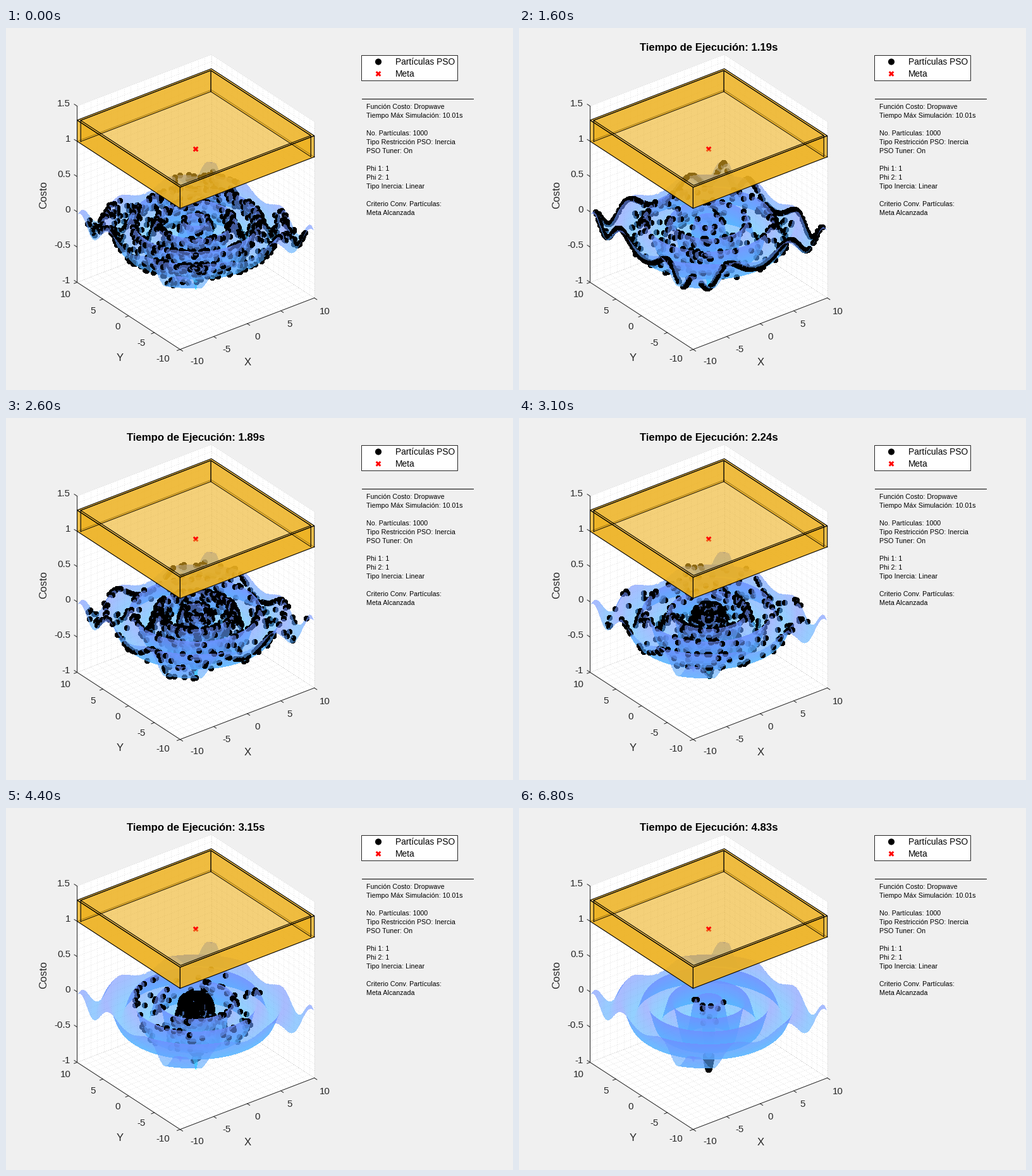
Write a matplotlib script that moves like this. It is 802 by 573 pixels and loops after 6900 ms.

```python
import numpy as np
import matplotlib.pyplot as plt
from matplotlib.animation import FuncAnimation
from matplotlib.collections import LineCollection
from matplotlib.patches import Circle, Polygon, Rectangle

W, H, DPI = 802, 573, 64
PT = 72 / DPI                       # points per pixel
FRAMES, STEP = 69, 100
COUNT, REACH = 1000, 9.6            # particles and how far out they may go
INK = "#262626"
GOLD = (0.929, 0.694, 0.125)

# Orthographic view: azimuth -37.5, elevation 30
COS, SIN = np.cos(np.radians(37.5)), np.sin(np.radians(37.5))
UNIT, ZUNIT = 13.38, 111.6
CX, CY = 300.1, 303.3


def project(x, y, z):
    u, v = COS * x - SIN * y, -SIN * x - COS * y
    return CX + UNIT * u, CY + UNIT / 2 * v - ZUNIT * z


def nearness(v, z):
    """Distance towards the camera, in pixels."""
    return UNIT * 0.866 * v + ZUNIT * 0.577 * z


def cost(r):
    return -(1 + np.cos(2.07 * r)) / (0.5 * r + 2)


# ---- figure ---------------------------------------------------------------
plt.rcParams["font.family"] = "Liberation Sans"
fig = plt.figure(figsize=(W / DPI, H / DPI), dpi=DPI, facecolor="#f0f0f0")
ax = fig.add_axes([0, 0, 1, 1])
ax.set_xlim(0, W)
ax.set_ylim(H, 0)
ax.axis("off")


def label(x, y, s, size, ha="left", color="black", **kw):
    return ax.text(x, y + 0.36 * size, s, fontsize=size * PT, ha=ha,
                   va="baseline", color=color, **kw)


def line(points, color=INK, width=1.0, z=2, **kw):
    xs, ys = zip(*points)
    return ax.plot(xs, ys, color=color, lw=width * PT, zorder=z, **kw)[0]


def face(corners, alpha=1.0, color=GOLD, z=4, edge=None):
    pts = [project(*c) for c in corners]
    ax.add_patch(Polygon(pts, fc=color, ec="none", alpha=alpha, zorder=z))
    if edge:
        line(pts + pts[:1], "black", edge, z + 0.5)


# ---- axes box, grid and ticks ---------------------------------------------
def draw_axes():
    lo, hi = -10, 10
    face([(lo, lo, -1), (hi, lo, -1), (hi, hi, -1), (lo, hi, -1)], color="white", z=0)
    face([(hi, lo, -1), (hi, hi, -1), (hi, hi, 1.5), (hi, lo, 1.5)], color="white", z=0)
    face([(lo, hi, -1), (hi, hi, -1), (hi, hi, 1.5), (lo, hi, 1.5)], color="white", z=0)

    segs = []

    def seg(a, b):
        segs.append([project(*a), project(*b)])

    for t in range(lo, hi + 1):
        seg((t, lo, -1), (t, hi, -1))
        seg((lo, t, -1), (hi, t, -1))
        seg((t, hi, -1), (t, hi, 1.5))
        seg((hi, t, -1), (hi, t, 1.5))
    for z in np.linspace(-1, 1.5, 26):
        seg((lo, hi, z), (hi, hi, z))
        seg((hi, lo, z), (hi, hi, z))
    ax.add_collection(LineCollection(segs, colors=[(0.1, 0.1, 0.1, 0.2)],
                                     linewidths=0.7 * PT,
                                     linestyles=[(0, (1.2, 3))], zorder=1))

    line([project(lo, hi, 1.5), project(lo, hi, -1),
          project(lo, lo, -1), project(hi, lo, -1)])
    for t in range(lo, hi + 1, 5):
        line([project(t, lo, -1), project(t, lo - 0.5, -1)])
        line([project(lo, t, -1), project(lo - 0.45, t, -1)])
        k = (t - lo) / 5
        label(291.5 + 51 * k, 527 - 19.8 * k, str(t), 15, color=INK)
        label(259.5 - 39.2 * k, 523 - 25.5 * k, str(t), 15, "right", INK)
    for k in range(6):
        z = -1 + k / 2
        line([project(lo, hi, z), project(lo, hi + 0.55, z)])
        label(102, 398.7 - 56 * k, f"{z:g}", 15, "right", INK)
    label(382.5, 528, "X", 16.7, "center", INK)
    label(180.5, 521, "Y", 16.7, "center", INK)
    ax.text(59.5, 264, "Costo", rotation=90, fontsize=16.7 * PT, color=INK,
            ha="center", va="center")


# ---- golden tray ----------------------------------------------------------
def draw_tray():
    a, b, z0, z1 = 10, 9.7, 1, 1.3

    def square(s, z):
        return [(-s, s, z), (s, s, z), (s, -s, z), (-s, -s, z)]

    out0, out1, in0, in1 = square(a, z0), square(a, z1), square(b, z0), square(b, z1)
    face(out0, 0.6)
    for i in (0, 1):
        j = i + 1
        face([in0[i], in0[j], in1[j], in1[i]], 0.86, z=4.1, edge=0.9)
        face([in1[i], in1[j], out1[j], out1[i]], 0.86, z=4.1)
    for i in (2, 3):
        j = (i + 1) % 4
        face([out0[i], out0[j], out1[j], out1[i]], 0.8, z=4.2, edge=1.1)
        face([in1[i], in1[j], out1[j], out1[i]], 0.5, z=4.2)
    for ring in (in1, out1):
        pts = [project(*c) for c in ring]
        line(pts + pts[:1], "black", 1.1, 5)
    line([project(*c) for c in out0[:3]], "black", 0.8, 5, alpha=0.4)
    for i in (0, 2):
        line([project(*in0[i]), project(*in1[i])], "black", 0.8, 5, alpha=0.7)


def cross(x, y, low="red", z=6):
    r = 3.3
    tails = line([(x - r, y + r), (x, y), (x + r, y + r)], low, 3, z,
                 solid_capstyle="butt", solid_joinstyle="miter")
    line([(x - r, y - r), (x, y), (x + r, y - r)], "red", 3, z + 0.1,
         solid_capstyle="butt", solid_joinstyle="miter")
    return tails


# ---- legend and notes -----------------------------------------------------
def draw_notes():
    ax.add_patch(Rectangle((561.5, 42.5), 152, 40, fc="white", ec=INK, lw=PT, zorder=2))
    ax.add_patch(Circle((589, 53.5), 4.6, color="black", zorder=3))
    cross(589, 72.5)
    label(615.7, 53.5, "Partículas PSO", 13.7)
    label(615.7, 72.5, "Meta", 13.7)
    line([(562.5, 111.9), (738.5, 111.9)], "black")
    notes = ["Función Costo: Dropwave", "Tiempo Máx Simulación: 10.01s", "",
             "No. Partículas: 1000", "Tipo Restricción PSO: Inercia",
             "PSO Tuner: On", "", "Phi 1: 1", "Phi 2: 1",
             "Tipo Inercia: Linear", "", "Criterio Conv. Partículas:",
             "Meta Alcanzada"]
    for i, s in enumerate(notes):
        label(570, 124.3 + 14 * i, s, 10.67)


# ---- translucent surface, layered per pixel -------------------------------
X0, X1, Y0, Y1 = 100, 502, 200, 426
LAYERS, ALPHA = 16, 0.6
SHAPE = (Y1 - Y0, X1 - X0)


def trace_layers():
    """Depth and colour value of each surface layer, front to back."""
    depth = np.full((LAYERS, *SHAPE), -np.inf)
    tone = np.zeros_like(depth)
    rows = np.arange(Y0, Y1) + 0.5
    v = np.linspace(14.2, -14.2, 700)
    for i in range(SHAPE[1]):
        u = (X0 + i + 0.5 - CX) / UNIT
        x, y = COS * u - SIN * v, -SIN * u - COS * v
        z = cost(np.hypot(x, y))
        py = CY + UNIT / 2 * v - ZUNIT * z
        inside = np.maximum(abs(x), abs(y)) <= 10
        below = py > rows[:, None]
        hit = (below[:, 1:] != below[:, :-1]) & inside[1:] & inside[:-1]
        j, k = np.nonzero(hit)
        n = hit.cumsum(axis=1)[j, k] - 1
        keep = n < LAYERS
        j, k, n = j[keep], k[keep], n[keep]
        t = (rows[j] - py[k]) / (py[k + 1] - py[k])
        zz = z[k] + t * (z[k + 1] - z[k])
        vv = v[k] + t * (v[k + 1] - v[k])
        depth[n, j, i] = nearness(vv, zz)
        tone[n, j, i] = (zz + 1) / 2.3
    return depth, tone


def blend_layers(depth, tone):
    """Colour and opacity after the first n layers, for every n."""
    color = np.zeros((LAYERS + 1, *SHAPE, 3))
    cover = np.zeros((LAYERS + 1, *SHAPE))
    for n in range(LAYERS):
        a = np.where(np.isfinite(depth[n]), ALPHA, 0) * (1 - cover[n])
        cool = np.stack([tone[n], 1 - tone[n], np.ones(SHAPE)], axis=-1)
        color[n + 1] = color[n] + a[..., None] * cool
        cover[n + 1] = cover[n] + a
    return color, cover


# ---- swarm ----------------------------------------------------------------
rng = np.random.default_rng(7)


def spread(core, r_core, r_max, power):
    """Radii: a share in a dense core, the rest trailing outwards."""
    u = rng.random(COUNT)
    tail = np.clip((u - core) / (1 - core), 0, 1)
    return np.where(u < core, r_core * np.sqrt(u / core),
                    r_core + (r_max - r_core) * tail ** power)


def plan_swarm():
    start = rng.uniform(-REACH, REACH, (COUNT, 2))
    angle = np.arctan2(start[:, 1], start[:, 0])
    wide = spread(0.35, 10, 16, 0.2)
    phases = [(9, spread(0.62, 1.9, 8, 1.6)), (14, wide), (17, wide),
              (26, spread(0.6, 5.5, 14, 1)), (31, spread(0.6, 3.5, 12, 1.3)),
              (37, spread(0.62, 2, 10, 1.6)), (43, spread(0.7, 1.9, 9, 2)),
              (50, spread(0.8, 1.8, 4.7, 1)), (53, spread(0.85, 1.75, 4.5, 1)),
              (60, spread(0.93, 1.2, 3, 1)), (68, spread(0.98, 0.35, 1.8, 0.7))]
    times, places = [0], [start]
    for t, r in phases:
        turn = angle + rng.normal(0, 0.25, COUNT)
        times.append(t)
        places.append(np.stack([r * np.cos(turn), r * np.sin(turn)], axis=1))
    return times, places


TIMES, PLACES = plan_swarm()


def swarm(k):
    i = min(np.searchsorted(TIMES, k, side="right"), len(TIMES) - 1)
    t = (k - TIMES[i - 1]) / (TIMES[i] - TIMES[i - 1])
    p = PLACES[i - 1] * (1 - t) + PLACES[i] * t
    p = p / np.maximum(1, abs(p).max(axis=1) / REACH)[:, None]   # stop at the border
    return p[:, 0], p[:, 1]


DY, DX = np.mgrid[-5:6, -5:6]
DISC = DX ** 2 + DY ** 2 <= 4.5 ** 2
DX, DY = DX[DISC], DY[DISC]

DEPTH, TONE = trace_layers()
COLOR, COVER = blend_layers(DEPTH, TONE)


def render(k):
    x, y = swarm(k)
    z = cost(np.hypot(x, y))
    px, py = project(x, y, z)
    near = nearness(-SIN * x - COS * y, z)
    col = np.clip(np.floor(px).astype(int)[:, None] + DX - X0, 0, SHAPE[1] - 1)
    row = np.clip(np.floor(py).astype(int)[:, None] + DY - Y0, 0, SHAPE[0] - 1)
    dots = np.full(SHAPE, -np.inf)
    np.maximum.at(dots, (row, col), np.broadcast_to(near[:, None], col.shape))

    n = (DEPTH > dots).sum(axis=0)[None]
    rgb = np.take_along_axis(COLOR, n[..., None], axis=0)[0]
    a = np.take_along_axis(COVER, n, axis=0)[0]
    a = np.where(np.isfinite(dots), 1, a)
    rgb = rgb / np.maximum(a, 1e-6)[..., None]
    return np.clip(np.dstack([rgb, a]), 0, 1)


draw_axes()
draw_tray()
draw_notes()
goal_tails = cross(*project(0, 0, 1))
title = label(300.5, 30, "", 16.7, "center", weight="bold")
surface = ax.imshow(render(0), extent=(X0, X1, Y1, Y0), aspect="auto",
                    interpolation="nearest", zorder=3)
ax.set_xlim(0, W)
ax.set_ylim(H, 0)


def update(k):
    surface.set_data(render(k))
    title.set_text(f"Tiempo de Ejecución: {0.07 * (k + 1):.2f}s" if k else "")
    goal_tails.set_color("#f4591a" if k else "red")
    return surface, title, goal_tails


anim = FuncAnimation(fig, update, frames=FRAMES, interval=STEP,
                     repeat=True, repeat_delay=0, blit=False)
plt.show()
```
